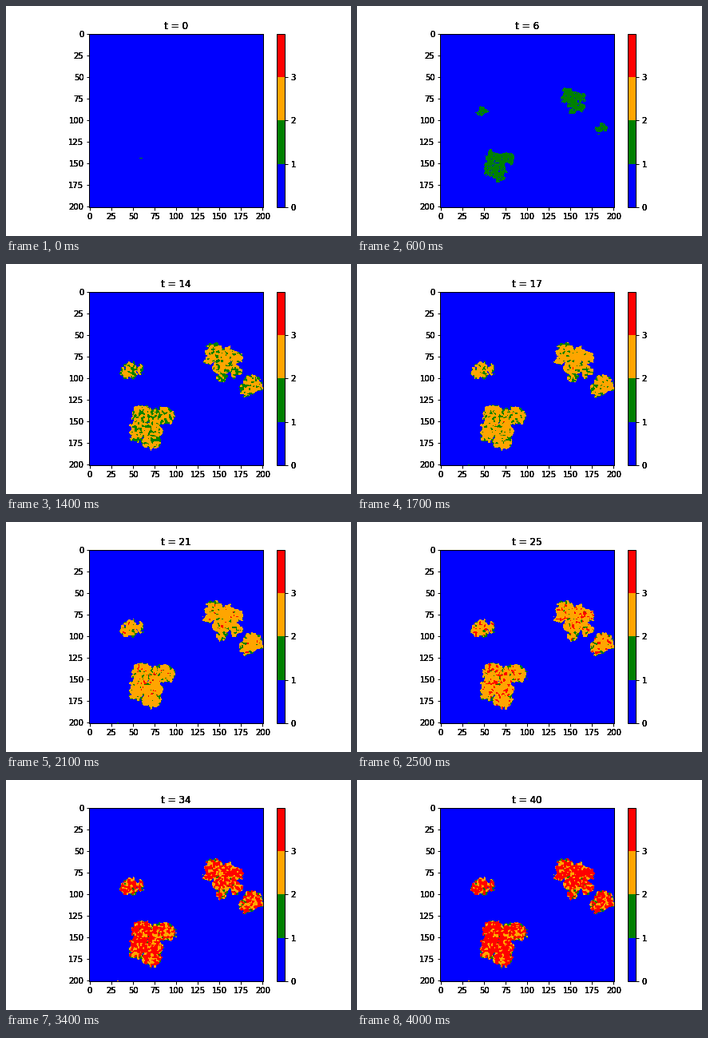
Write a matplotlib script that moves like this. It is 432 px wide and 288 px high and loops after 4100 ms.

```python
import numpy as np
import matplotlib.pyplot as plt
from matplotlib.animation import FuncAnimation
from matplotlib.artist import Artist
from matplotlib.colors import ListedColormap
from matplotlib.text import Text

SIZE = 201
STEPS = 41

rng = np.random.default_rng(12)
y, x = np.mgrid[:SIZE, :SIZE]


def blur(a):
    for axis in (0, 1):
        a = (np.roll(a, 1, axis) + 1.4 * a + np.roll(a, -1, axis)) / 3.4
    return a


def noise(passes):
    """Blurred noise, ranked so that its values spread evenly over 0..1."""
    a = rng.random((SIZE, SIZE))
    for _ in range(passes):
        a = blur(a)
    return (a.ravel().argsort().argsort() / a.size).reshape(a.shape)


rough = 3.6 * (noise(2) - 0.5)
hole = noise(0)
ripe = noise(1)
burn = noise(1)

# Each cluster: first step, seed cell, lobes (x, y, radius) at full size
clusters = [
    (0, (59.5, 144), [(61, 142, 12.5), (76, 144, 11), (89, 143, 11.5),
                      (58, 159, 12), (73, 162, 12.5), (72, 173, 11),
                      (54, 168, 7)]),
    (1, (151, 71), [(145, 71, 12), (160, 73, 10), (169, 76, 9),
                    (154, 86, 12), (138, 80, 6.5), (153, 100, 6.5),
                    (169, 92, 8)]),
    (4, (47, 89), [(48, 88, 8), (41, 94, 7), (49, 95, 6.5), (59, 90, 5.5)]),
    (3, (186, 108), [(188, 106, 10.5), (181, 114, 8), (194, 108, 6.5)]),
]


def growth(t, start):
    """Fast spread up to step 10, then a slow settling."""
    spread = np.clip((t - start) / (10 - start), 0, 1) ** 0.7
    settle = 1 - np.exp(-max(t - 10, 0) / 8)
    return 0.93 * spread + 0.07 * settle


def field(t):
    """Signed distance to the outbreak's edge, negative inside."""
    d = np.full((SIZE, SIZE), 99.0)
    for start, (sx, sy), lobes in clusters:
        s = growth(t, start)
        if s == 0:
            continue
        for lx, ly, r in lobes:
            cx, cy = sx + s * (lx - sx), sy + s * (ly - sy)
            d = np.minimum(d, np.hypot(x - cx, y - cy) - s * r)
    return d + rough


def add_speck(grid, t, where, born, turned):
    if t >= born:
        grid[where] = 1 if t < turned else 2


def state(t):
    d = field(t)
    depth = np.maximum(-d, 0)
    gaps = 0.0055 * max(13 - t, 0)
    orange = 1 - np.exp(-(max(t - 10, 0) / 2.6) ** 0.75)
    red = 0.8 / (1 + np.exp((28 - t) / 3)) - 0.01

    first = (d < 0) & (hole >= gaps)
    first[144, 58:62] = True
    second = first & (ripe + 0.55 * np.exp(-depth / 0.7) < orange)
    third = second & (burn + 0.3 * np.exp(-depth / 1.2) < red)
    grid = first.astype(int) + second + third

    # Tiny outbreak on the wrapped top and bottom edges
    add_speck(grid, t, np.s_[:2, 31:34], 17, 20)
    add_speck(grid, t, np.s_[-1:, 32:34], 15, 34)
    return grid


class HeavyText(Artist):
    """Redraws every label so that its soft edges turn solid."""

    def draw(self, renderer):
        for text in self.figure.findobj(Text):
            for _ in range(4):
                text.draw(renderer)


plt.rcParams.update({
    "font.family": "DejaVu Sans",
    "figure.subplot.bottom": 0.125,
    "axes.linewidth": 1,
    "xtick.major.width": 1,
    "ytick.major.width": 1,
})
fig, ax = plt.subplots(figsize=(6, 4), dpi=72)
cmap = ListedColormap(["blue", "green", "orange", "red"])
image = ax.imshow(state(0), cmap=cmap, vmin=0, vmax=4, interpolation="nearest")
fig.colorbar(image, ax=ax, ticks=range(4))
ax.set_xticks(range(0, 201, 25))
ax.set_yticks(range(0, 201, 25))
title = ax.set_title("t = 0")
heavy = HeavyText()
heavy.set_zorder(10)
fig.add_artist(heavy)


def update(t):
    image.set_data(state(t))
    title.set_text(f"t = {t}")
    return image, title


anim = FuncAnimation(fig, update, frames=STEPS, interval=100, repeat=True,
                     repeat_delay=0, blit=False)
plt.show()
```
